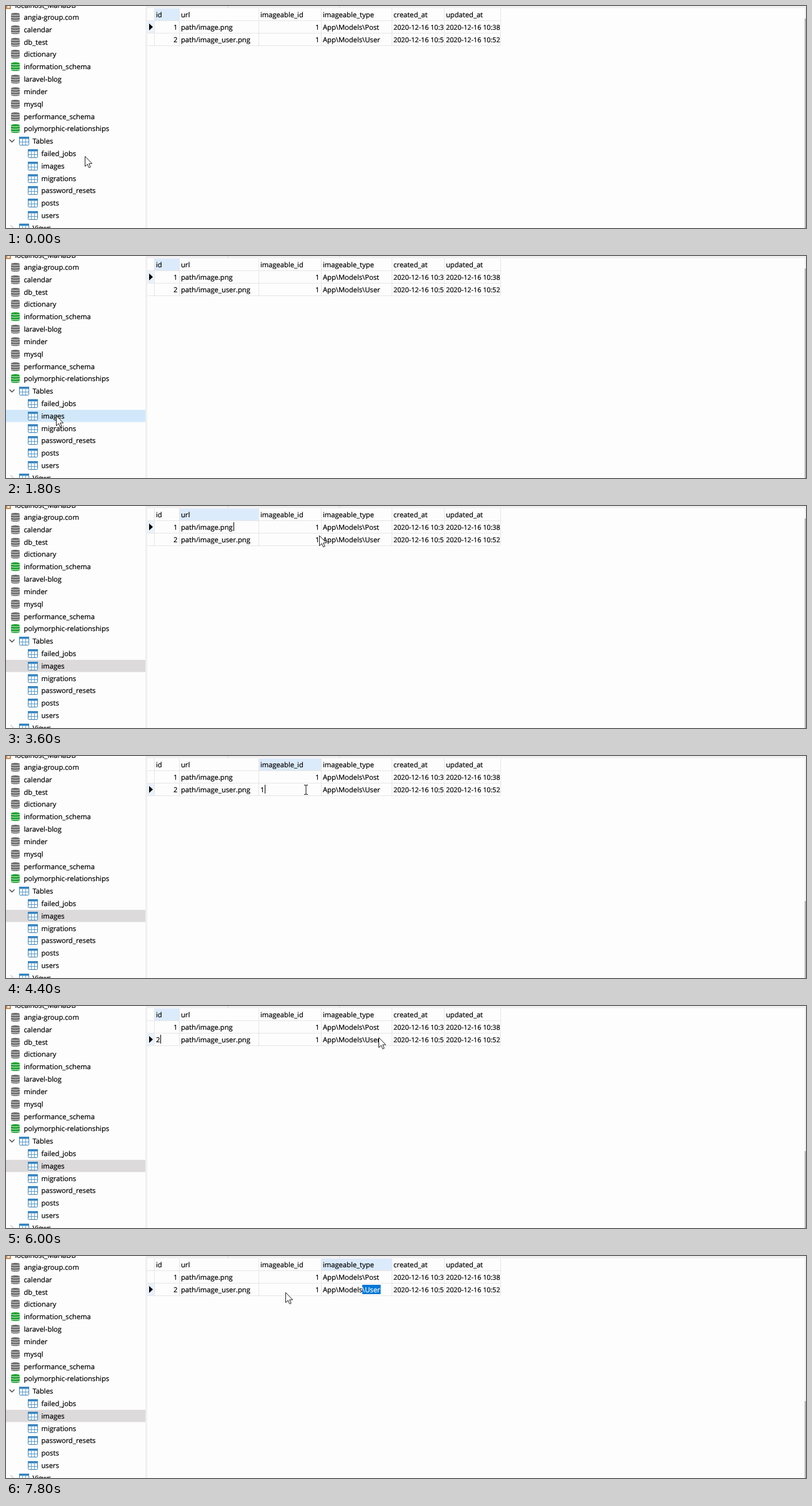
Write an HTML page that moves like this. It is 1280x355 px and loops after 8000 ms.

```html
<!DOCTYPE html>
<html lang="en">
<head>
<meta charset="utf-8">
<title>Database browser</title>
<style>
  html, body { margin: 0; width: 100%; height: 100%; overflow: hidden; background: #fdfdfd; }
  svg { display: block; width: 1280px; height: 355px; }
  text {
    font: 11.2px "Open Sans", "Noto Sans", sans-serif; white-space: pre;
    color: #000; fill: currentColor; stroke: currentColor; stroke-width: .22px;
    text-rendering: geometricPrecision;
  }
  .date { font-size: 10.8px; }
  .rule { stroke: #e6e6e6; }
  .focus { fill: #dcebfc; }
</style>
</head>
<body>
<svg id="stage" viewBox="0 0 1280 355">
  <defs>
    <g id="db">
      <path d="M-7-5C-7-7.8 7-7.8 7-5V5C7 7.8-7 7.8-7 5Z"/>
      <path d="M-7-4C-5-2.7 5-2.7 7-4M-7 0C-5 1.3 5 1.3 7 0M-7 4C-5 5.3 5 5.3 7 4" fill="none" stroke="#fdfdfd" stroke-width=".9"/>
    </g>
    <g id="table">
      <rect x="-7.5" y="-6.5" width="15" height="13" rx="1" fill="#fff" stroke="#3c82b8"/>
      <path d="M-8-7H8V-3.5H-8Z" fill="#3585c2"/>
      <path d="M-2.5-3.5V6M2.5-3.5V6M-7 1.5H7" stroke="#5d9cca"/>
    </g>
    <clipPath id="createdClip"><rect x="618" y="0" width="83" height="70"/></clipPath>
    <clipPath id="updatedClip"><rect x="702" y="0" width="89" height="70"/></clipPath>
  </defs>
  <g id="sidebar"></g>
  <g id="grid"></g>
  <g id="pointer">
    <path id="arrow" d="M.5.5V16.5L4.2 13L6.7 18.6L9.2 17.5L6.7 12H11.7Z" fill="#fff" stroke="#222"/>
    <path id="beam" d="M-3-7.5H-.8L0-6.8L.8-7.5H3M0-7V7M-3 7.5H-.8L0 6.8L.8 7.5H3" fill="none" stroke="#111"/>
  </g>
</svg>
<script>
const LOOP = 8000, STEP = 200;
const $ = id => document.getElementById(id);
const sidebar = $("sidebar"), grid = $("grid");

function add(parent, tag, attrs, content = "") {
  const el = document.createElementNS("http://www.w3.org/2000/svg", tag);
  for (const key in attrs) el.setAttribute(key, attrs[key]);
  el.textContent = content;
  parent.append(el);
  return el;
}
const box = (parent, x, y, width, height, fill) => add(parent, "rect", { x, y, width, height, fill });
const label = (parent, x, y, content, attrs = {}) => add(parent, "text", { x, y, ...attrs }, content);
const icon = (name, x, y, fill = "#000") =>
  add(sidebar, "use", { href: "#" + name, transform: `translate(${x} ${y})`, fill });
const line = d => add(grid, "path", { d, class: "rule" });
const show = (el, on) => el.setAttribute("visibility", on ? "visible" : "hidden");

// Sidebar tree
const rowY = i => Math.round(18 + i * 19.82);
const highlight = box(sidebar, 0, 246, 223, 19.5, "#d1e8fa");
box(sidebar, 0, 0, 8, 5, "#c98f5c");
box(sidebar, 2, 0, 4, 3, "#f3e3d2");
label(sidebar, 14.5, 2.5, "localhost_MariaDB");
["angia-group.com", "calendar", "db_test", "dictionary", "information_schema", "laravel-blog",
 "minder", "mysql", "performance_schema", "polymorphic-relationships"].forEach((name, i) => {
  icon("db", 15, rowY(i), i === 4 || i === 9 ? "#18a02c" : "#6c6c6c");
  label(sidebar, 28.5, rowY(i) + 4, name);
});
["Tables", "failed_jobs", "images", "migrations", "password_resets", "posts", "users", "Views"].forEach((name, i) => {
  const indent = i % 7 ? 14 : 0, y = rowY(i + 10);
  icon("table", 29 + indent, y);
  label(sidebar, 42.5 + indent, y + 4, name);
});
add(sidebar, "path", { d: "M5.5 213.5L9.5 217.5L13.5 213.5", fill: "none", stroke: "#444", "stroke-width": 1.3 });
add(sidebar, "path", { d: "M7.5 350.5L11.5 354.5L7.5 358.5", fill: "none", stroke: "#aaa" });

// Grid
box(grid, 223, 0, 3, 355, "#f0f0f0");
box(grid, 226, 0, 1054, 3.5, "#f1eff0");
for (const x of [355, 533]) box(grid, x, 0, 1, 3, "#d9d9d9");
box(grid, 1278, 0, 2, 355, "#eeeeee");
const scrollThumb = box(grid, 1278, 20, 1.5, 335, "#999");

const edges = [237.5, 277.5, 404.5, 504.5, 617.5, 701.5, 791.5];
const headers = ["id", "url", "imageable_id", "imageable_type", "created_at", "updated_at"];
const data = [
  ["1", "path/image.png", "1", "App\\Models\\Post", "2020-12-16 10:38:14", "2020-12-16 10:38:14"],
  ["2", "path/image_user.png", "1", "App\\Models\\User", "2020-12-16 10:52:07", "2020-12-16 10:52:07"]
];
const textX = c => edges[c] + 2.5;
const baseline = r => 38 + r * 20;
const focusHeader = add(grid, "rect", { y: 4, height: 19, class: "focus" });
const focusRow = box(grid, 226, 24, 11, 19, "#eaf2fb");
for (const y of [23.5, 43.5, 63.5]) line(`M226 ${y}H791`);
for (const x of edges) line(`M${x} 4V63`);
const rowMark = add(grid, "path", { d: "M229 28L235 33.5L229 39Z", fill: "#000" });
const selection = box(grid, 0, 46, 0, 15, "#0078d7");
headers.forEach((name, c) => label(grid, textX(c), 18, name));
const cells = data.map((row, r) => row.map((value, c) => label(grid, textX(c), baseline(r), value,
  c > 3 ? { class: "date", "clip-path": `url(#${c === 4 ? "created" : "updated"}Clip)` } : {})));
const typeCell = cells[1][3];
typeCell.textContent = "App\\Models";
const selectedText = add(typeCell, "tspan", {}, "\\User");
const caret = box(grid, 0, 0, 1, 14, "#000");

// [time, x, y] of the pointer hot spot
const path = [
  [0, 126, 240], [600, 100, 250], [800, 100, 250], [1400, 80, 255], [2200, 80, 255],
  [2500, 215, 150], [2800, 345, 42], [3200, 390, 40], [3600, 501, 47], [4000, 484, 53],
  [4400, 480, 54], [4800, 390, 53], [5200, 253, 49], [5400, 251, 52], [5600, 290, 53],
  [6000, 596, 50], [6200, 600, 54], [6400, 600, 54], [6600, 574, 54], [7000, 518, 54],
  [7200, 524, 53], [7600, 566, 48], [7800, 447, 58]
];
// Focused cell over time
const focuses = [
  { at: 0, row: 0, col: 0 },
  { at: 2800, row: 0, col: 1, edit: true },
  { at: 4000, row: 1, col: 2, edit: true },
  { at: 5400, row: 1, col: 0, edit: true },
  { at: 6200, row: 1, col: 3, edit: true }
];

function pointerAt(t) {
  const next = path.findIndex(p => p[0] > t);
  if (next < 0) return path.at(-1).slice(1);
  const [t0, x0, y0] = path[next - 1], [t1, x1, y1] = path[next];
  const k = (t - t0) / (t1 - t0);
  return [x0 + (x1 - x0) * k, y0 + (y1 - y0) * k];
}

function placeNumber(r, c, editing) {
  cells[r][c].setAttribute("x", editing ? textX(c) : edges[c + 1] - 3);
  cells[r][c].setAttribute("text-anchor", editing ? "start" : "end");
}

function draw(t) {
  const { row, col, edit } = focuses.findLast(f => f.at <= t);
  const [x, y] = pointerAt(t);

  show(highlight, t >= 600);
  highlight.setAttribute("fill", t < 2000 ? "#d1e8fa" : t < 2800 ? "#cce8ff" : "#dcdada");
  focusHeader.setAttribute("x", edges[col] + 0.5);
  focusHeader.setAttribute("width", edges[col + 1] - edges[col] - 1);
  for (const el of [rowMark, focusRow]) el.setAttribute("transform", `translate(0 ${row * 20})`);
  for (const r of [0, 1]) for (const c of [0, 2]) placeNumber(r, c, edit && r === row && c === col);

  const selected = t >= 6600;
  show(selection, selected);
  selectedText.setAttribute("color", selected ? "#fff" : "#000");
  const end = textX(col) + cells[row][col].getComputedTextLength();
  if (selected) {
    const start = typeCell.getStartPositionOfChar(10).x;
    selection.setAttribute("x", start);
    selection.setAttribute("width", end - start + 1);
  }
  show(caret, edit && !selected);
  caret.setAttribute("x", Math.round(end + 1));
  caret.setAttribute("y", baseline(row) - 12);

  const top = t < 4400 ? 20 : 232;
  scrollThumb.setAttribute("y", top);
  scrollThumb.setAttribute("height", 355 - top);

  const overEditor = edit && x > edges[col] && x < edges[col + 1] && y > 24 + row * 20 && y < 43 + row * 20;
  show($("beam"), overEditor);
  show($("arrow"), !overEditor);
  $("pointer").setAttribute("transform", `translate(${Math.round(x)} ${Math.round(y)})`);
}

function tick(now) {
  draw(Math.floor(now % LOOP / STEP) * STEP);
  requestAnimationFrame(tick);
}
draw(0);
requestAnimationFrame(tick);
</script>
</body>
</html>
```
